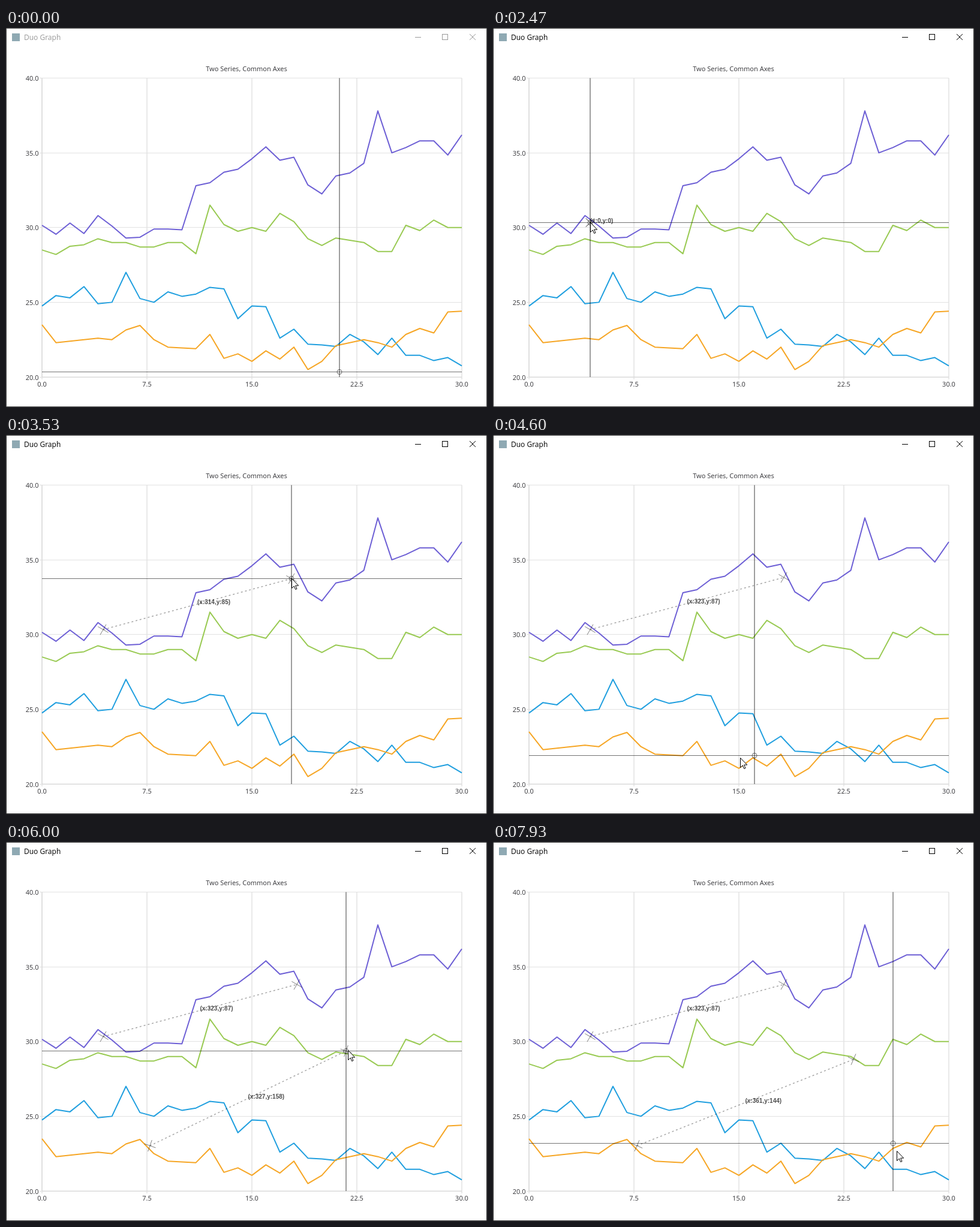
An HTML page with a canvas for the animation above (8000 ms loop, 802 by 632 pixels).

```html
<!DOCTYPE html>
<html lang="en">
<head>
<meta charset="utf-8">
<title>Duo Graph</title>
<style>
  html, body { margin: 0; width: 100%; height: 100%; overflow: hidden; background: #fff; }
  canvas { display: block; }
</style>
</head>
<body>
<canvas id="stage" width="802" height="632"></canvas>
<script>
const ctx = document.getElementById('stage').getContext('2d');
const LOOP = 8000, STEP = 1000 / 15;
const LEFT = 60, RIGHT = 760, TOP = 83.5, BOTTOM = 582;
const px = v => LEFT + v * (RIGHT - LEFT) / 30;
const py = v => BOTTOM - (v - 20) * (BOTTOM - TOP) / 20;

const series = [
  ['#6d5fd5', [30.15, 29.55, 30.3, 29.6, 30.8, 30.1, 29.3, 29.35, 29.9, 29.9, 29.85, 32.8, 33, 33.7, 33.9, 34.6,
    35.4, 34.5, 34.7, 32.85, 32.25, 33.45, 33.65, 34.3, 37.8, 35, 35.35, 35.8, 35.8, 34.85, 36.2]],
  ['#99ca53', [28.5, 28.2, 28.75, 28.85, 29.25, 29, 29, 28.7, 28.7, 29, 29, 28.25, 31.5, 30.2, 29.75, 30,
    29.75, 30.95, 30.4, 29.25, 28.8, 29.3, 29.15, 29, 28.4, 28.4, 30.15, 29.8, 30.5, 30, 30]],
  ['#209fdf', [24.75, 25.45, 25.3, 26.05, 24.9, 25, 27, 25.25, 25, 25.7, 25.4, 25.55, 26, 25.9, 23.9, 24.75,
    24.7, 22.6, 23.2, 22.2, 22.15, 22.05, 22.85, 22.35, 21.5, 22.6, 21.45, 21.45, 21.1, 21.3, 20.75]],
  ['#f6a625', [23.5, 22.3, 22.4, 22.5, 22.6, 22.5, 23.15, 23.45, 22.5, 22, 21.95, 21.9, 22.85, 21.25, 21.55, 21.05,
    21.75, 21.2, 22, 20.5, 21.05, 22.1, 22.3, 22.5, 22.3, 22, 22.85, 23.25, 22.95, 24.35, 24.4]]
];

// Pointer path: [step, x, y]
const path = [
  [5, 330, 8], [15, 174, 358], [18, 169, 329], [19, 168, 313], [22, 165, 304], [30, 162, 324],
  [38, 162, 324], [47, 455, 246], [52, 476, 239], [54, 476, 239], [55, 485, 237],
  [62, 485, 237], [68, 436, 534], [69, 412, 538], [75, 246, 511], [77, 240, 506],
  [84, 240, 506], [89, 567, 348], [90, 570, 347], [97, 596, 358], [104, 601, 362],
  [113, 601, 362], [118, 667, 502], [119, 673, 515]
];
const ENTER = 5, FOCUS = 37;
const drags = [[37, 56], [81, 107]]; // press and release steps

function slope(i, k) {
  const rate = j => (path[j + 1][k] - path[j][k]) / (path[j + 1][0] - path[j][0]);
  if (i === 0) return rate(0);
  if (i === path.length - 1) return rate(i - 1);
  const a = rate(i - 1), b = rate(i);
  return a * b <= 0 ? 0 : 2 * a * b / (a + b);
}

// Monotone cubic interpolation along the path
function pointer(step) {
  const last = path.length - 1;
  const s = Math.min(Math.max(step, path[0][0]), path[last][0]);
  let i = 0;
  while (i < last - 1 && s > path[i + 1][0]) i++;
  const span = path[i + 1][0] - path[i][0], u = (s - path[i][0]) / span;
  return [1, 2].map(k => Math.round(
    path[i][k] * (1 + 2 * u) * (1 - u) ** 2 + path[i + 1][k] * u * u * (3 - 2 * u) +
    span * u * (1 - u) * (slope(i, k) * (1 - u) - slope(i + 1, k) * u)));
}

// The crosshair trails the pointer by one step
function crosshair(step) {
  const p = pointer(step - 1);
  return p[1] < TOP ? [556, 573] : p;
}

function line(points, color, width = 1) {
  ctx.beginPath();
  points.forEach(([x, y]) => ctx.lineTo(x, y));
  ctx.strokeStyle = color;
  ctx.lineWidth = width;
  ctx.stroke();
}

function text(str, x, y, color, font, align = 'left') {
  ctx.font = font;
  ctx.fillStyle = color;
  ctx.textAlign = align;
  ctx.fillText(str, x, y);
}

function drawWindow(active) {
  const ink = active ? '#000' : '#999';
  ctx.fillStyle = '#fff';
  ctx.fillRect(0, 0, 802, 632);
  ctx.strokeStyle = active ? '#2b2b2b' : '#484848';
  ctx.lineWidth = 1;
  ctx.strokeRect(0.5, 0.5, 801, 631);
  ctx.fillStyle = '#8fa9b3';
  ctx.fillRect(10, 9, 13, 13);
  text('Duo Graph', 30, 20, ink, '12px "Open Sans", sans-serif');
  line([[682, 15.5], [692, 15.5]], ink);
  ctx.strokeRect(727.5, 10.5, 9, 9);
  line([[773, 10], [783, 20]], ink);
  line([[783, 10], [773, 20]], ink);
}

function drawChart() {
  const font = '11px "Noto Sans", sans-serif', ink = '#404044';
  text('Two Series, Common Axes', 401, 72, ink, font, 'center');
  for (let i = 0; i <= 4; i++) {
    const x = px(i * 7.5), y = Math.floor(py(20 + i * 5)) + 0.5;
    line([[x, TOP], [x, BOTTOM + 4]], '#e2e2e2', 1.5);
    line([[LEFT - 4, y], [RIGHT, y]], '#e2e2e2');
    text((i * 7.5).toFixed(1), x, 598, ink, font, 'center');
    text((20 + i * 5).toFixed(1), 54.5, y + 4, ink, font, 'right');
  }
  line([[LEFT, TOP], [LEFT, BOTTOM], [RIGHT, BOTTOM]], '#d6d6d6');
  ctx.lineJoin = 'round';
  for (const [color, values] of series) line(values.map((v, i) => [px(i), py(v)]), color, 2);
  ctx.lineJoin = 'miter';
}

function drawMeasure([x0, y0], [x1, y1]) {
  const angle = Math.atan2(y1 - y0, x1 - x0);
  ctx.setLineDash([3, 4]);
  line([[x0, y0 + 0.5], [x1, y1 + 0.5]], 'rgba(0,0,0,.35)', 1.5);
  ctx.setLineDash([]);
  for (const [x, y] of [[x0, y0], [x1, y1]]) {
    for (const turn of [Math.PI / 4, -Math.PI / 4]) {
      const dx = 10 * Math.cos(angle + turn), dy = 10 * Math.sin(angle + turn);
      line([[x - dx, y + 0.5 - dy], [x + dx, y + 0.5 + dy]], 'rgba(0,0,0,.5)');
    }
  }
  text(`(x:${Math.abs(x1 - x0)},y:${Math.abs(y1 - y0)})`, (x0 + x1) / 2, (y0 + y1) / 2 + 0.5,
    'rgba(0,0,0,.7)', 'bold 10px "Liberation Sans", sans-serif');
}

function drawCrosshair([x, y]) {
  line([[x, TOP], [x, BOTTOM]], 'rgba(0,0,0,.55)', 1.4);
  line([[LEFT, y + 0.5], [RIGHT, y + 0.5]], 'rgba(0,0,0,.55)');
  ctx.beginPath();
  ctx.arc(x, y + 0.5, 4, 0, 7);
  ctx.lineWidth = 1;
  ctx.stroke();
}

function drawPointer([x, y]) {
  const arrow = new Path2D('M.5 .5V16.5L4.3 13L6.7 18.5L9 17.5L6.6 12.1H11.7Z');
  ctx.save();
  ctx.translate(x, y);
  ctx.fillStyle = '#fff';
  ctx.fill(arrow);
  ctx.strokeStyle = '#000';
  ctx.lineWidth = 1;
  ctx.stroke(arrow);
  ctx.restore();
}

function render() {
  const step = Math.floor((performance.now() % LOOP + 5) / STEP);
  drawWindow(step >= FOCUS);
  drawChart();
  for (const [press, release] of drags) {
    if (step >= press) drawMeasure(crosshair(press), crosshair(Math.min(step, release)));
  }
  drawCrosshair(crosshair(step));
  if (step >= ENTER) drawPointer(pointer(step));
  requestAnimationFrame(render);
}
render();
</script>
</body>
</html>
```
